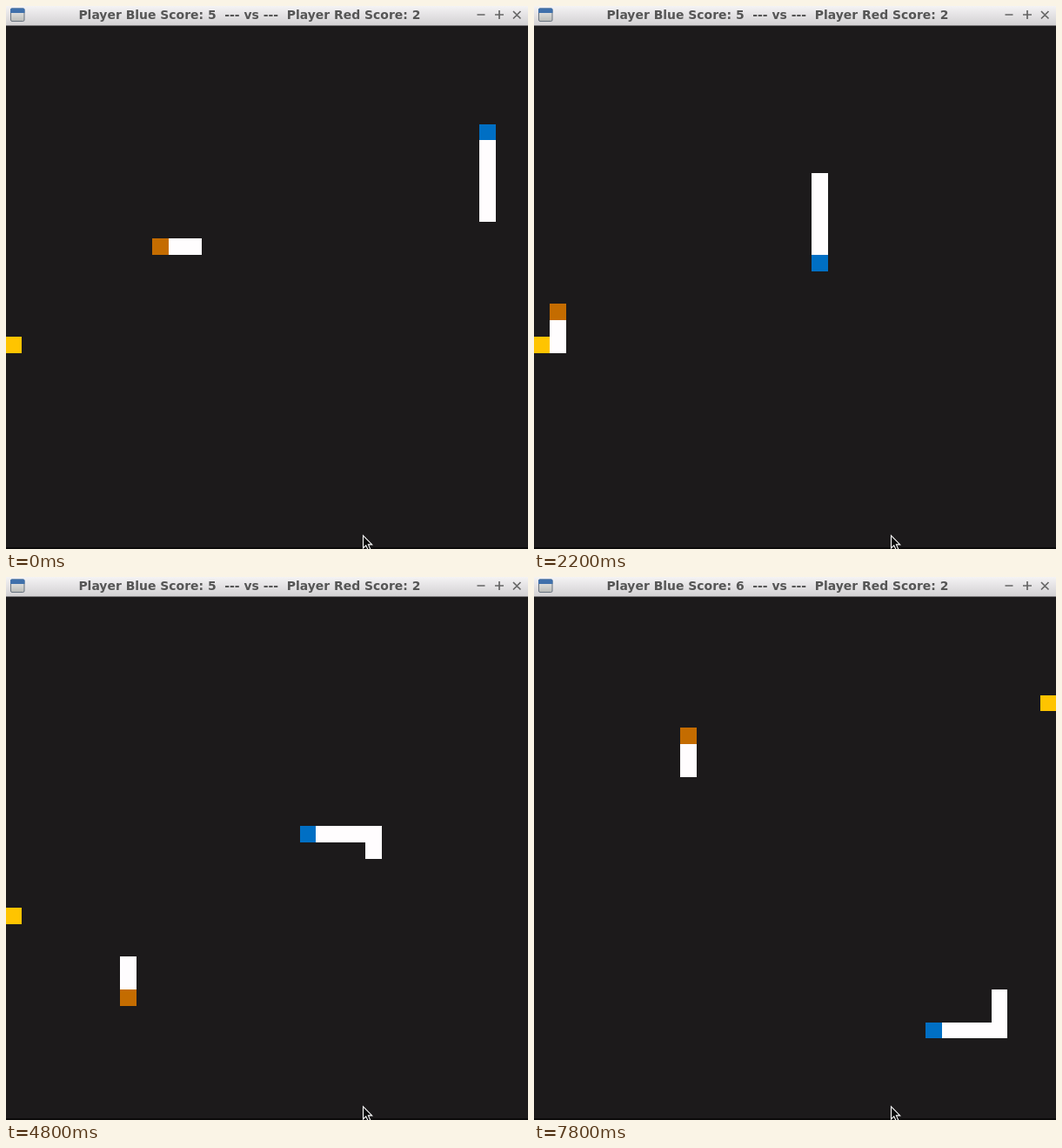
Recreate the animation shown at these times as an HTML page. Size 600x624 px, loop 8000 ms.

```html
<!DOCTYPE html>
<html lang="en">
<head>
<meta charset="utf-8">
<title>Two snakes</title>
<style>
  html, body { margin: 0; width: 100%; height: 100%; overflow: hidden; background: #1c1a1b; }
  svg { display: block; width: 600px; height: 624px; }
  text { font: bold 13.95px "DejaVu Sans", sans-serif; fill: #555; white-space: pre; }
  .controls { fill: none; stroke: #666; stroke-width: 1.7; }
</style>
</head>
<body>
<svg viewBox="0 0 600 624">
  <defs>
    <linearGradient id="bar" x2="0" y2="1">
      <stop offset="0" stop-color="#f4f3f4"/>
      <stop offset="1" stop-color="#d2d0d2"/>
    </linearGradient>
    <linearGradient id="pane" x2="0" y2="1">
      <stop offset="0" stop-color="#eeeeec"/>
      <stop offset="1" stop-color="#b9bbb8"/>
    </linearGradient>
  </defs>
  <rect width="600" height="624" fill="#1c1a1b"/>
  <rect y="622" width="600" height="2" fill="#0b0a0a"/>

  <rect width="600" height="22.5" fill="url(#bar)"/>
  <rect x="5.5" y="3" width="15.5" height="14.5" rx="1.5" fill="url(#pane)" stroke="#68737f"/>
  <path d="M5 8V4q0-1.5 1.5-1.5H20q1.5 0 1.5 1.5v4z" fill="#3f70ab"/>
  <text id="title" x="279.9" y="15" text-anchor="middle"></text>
  <path class="controls" d="M541.5 10h9M562 10h10M567 5v10M583 6l8.5 8.5M591.5 6L583 14.5"/>

  <path id="food" fill="#ffc400"/>
  <path id="body" fill="#fffdfe"/>
  <path id="redHead" fill="#c46c00"/>
  <path id="blueHead" fill="#006fc4"/>

  <path d="M410.5 608.5v14.5l3.3-3.1 2.5 5.4 2.5-1.1-2.4-5.3h4.3z" fill="#0a0a0a" stroke="#fff" stroke-width="1.1"/>
</svg>
<script>
const LOOP = 8000, TICK = 200, CELL = 18.8, GRID = 32;
const DIRS = { U: [0, -1], D: [0, 1], L: [-1, 0], R: [1, 0], J: [1, -2] };
const wrap = n => (n + GRID) % GRID;

// Expands runs such as "U7 L12" into the cells the head visits; J is a skipped corner.
function trace(start, runs) {
  const cells = [start];
  for (const run of runs.split(" ")) {
    const [dx, dy] = DIRS[run[0]];
    for (let i = +run.slice(1); i > 0; i--) {
      const [x, y] = cells[cells.length - 1];
      cells.push([wrap(x + dx), wrap(y + dy)]);
    }
  }
  return cells;
}

// pace: [time, index of the head on its trail]
const blue = {
  trail: trace([29, 11], "U7 L12 D10 R11 D5 L6 U5 L13 D5 L13 D7 L4"),
  pace: [[0, 5], [800, 14], [1200, 19], [2200, 29], [2400, 33], [3200, 43],
         [4800, 60], [6000, 74], [7200, 91], [7800, 98]],
};
const red = {
  trail: trace([11, 13], "L3 D7 L7 U4 L3 D5 R9 D7 R1 U1 J1 U17"),
  pace: [[0, 2], [800, 9], [2200, 20], [2400, 22], [3200, 27],
         [4800, 41], [6000, 49], [7800, 65]],
};
const MEAL = 83;  // trail index at which blue eats

function headIndex({ pace }, t) {
  const i = Math.max(1, pace.findIndex(([time]) => time >= t));
  const [t0, n0] = pace[i - 1], [t1, n1] = pace[i];
  return Math.round(n0 + (n1 - n0) * (t - t0) / (t1 - t0));
}

function square([col, row]) {
  const edge = (n, offset) => Math.round(n * CELL + offset);
  const x = edge(col, -0.8), y = edge(row, 22.8);
  return `M${x} ${y}H${edge(col + 1, -0.8)}V${edge(row + 1, 22.8)}H${x}z`;
}

const byId = id => document.getElementById(id);
const draw = (id, cells) => byId(id).setAttribute("d", cells.map(square).join(""));

function render(t) {
  const b = headIndex(blue, t), r = headIndex(red, t);
  const fed = b >= MEAL;
  draw("body", [...blue.trail.slice(b - (fed ? 6 : 5), b), ...red.trail.slice(r - 2, r)]);
  draw("blueHead", [blue.trail[b]]);
  draw("redHead", [red.trail[r]]);
  draw("food", [fed ? [31, 6] : [0, 19]]);
  byId("title").textContent =
    `Player Blue Score: ${fed ? 6 : 5}\u00a0 --- vs --- \u00a0Player Red Score: 2`;
}

let shown = -1;
function frame() {
  const t = Math.floor(performance.now() % LOOP / TICK) * TICK;
  if (t !== shown) render(shown = t);
  requestAnimationFrame(frame);
}
frame();
</script>
</body>
</html>
```
